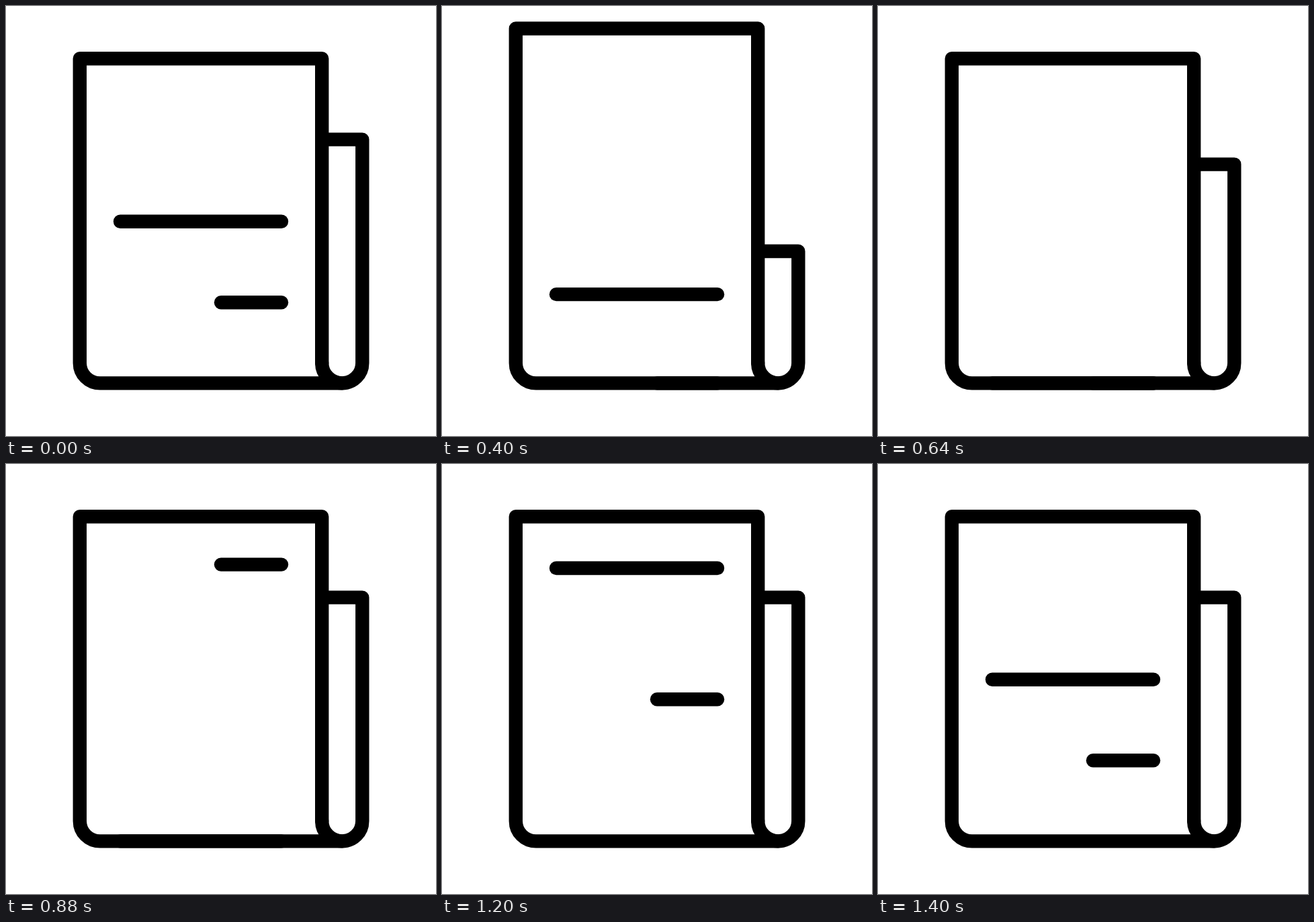
An HTML page for the animation above (2 s loop, 640 by 640 pixels).

```html
<!DOCTYPE html>
<html lang="en">
<head>
<meta charset="utf-8">
<title>Folded paper</title>
<style>
  html, body { margin: 0; width: 100%; height: 100%; overflow: hidden; background: #fff; }
  svg { display: block; width: 100vw; height: 100vh; }
  path { fill: none; stroke: #000; stroke-width: 20.4; stroke-linecap: round; stroke-linejoin: round; }
</style>
</head>
<body>
<svg viewBox="0 0 640 640">
  <path id="sheet"/>
  <path id="flap"/>
  <path id="long"/>
  <path id="short"/>
</svg>
<script>
  const LOOP = 2000, STEP = 40;
  const LEFT = 109.8, RIGHT = 470.2, EDGE = 530.3;
  const TOP = 78.3, BEND = 531.4, BASE = 561.4;
  const LONG_Y = 320.8, SHORT_Y = 441.2;

  const smooth = u => u * u * (3 - 2 * u);
  const settle = u => 1 - Math.pow(1 - u, 1.06);

  // Each move is [start ms, end ms, from, to, easing]; the latest one begun wins.
  const tracks = {
    top: [
      [120, 360, TOP, 28.3, smooth],
      [360, 560, 28.3, TOP, smooth]
    ],
    flap: [
      [120, 360, 198.6, 369.8, smooth],
      [360, 760, 369.8, 198.6, smooth]
    ],
    long: [
      [123, 873, LONG_Y, 672, smooth],
      [1080, 1400, TOP, LONG_Y, smooth]
    ],
    short: [
      [120, 287, SHORT_Y, BASE, smooth],
      [770, 1360, TOP, SHORT_Y, settle]
    ]
  };

  function valueAt(track, t) {
    let move = track[0];
    for (const next of track) if (t >= next[0]) move = next;
    const [start, end, from, to, ease] = move;
    const u = Math.min(1, Math.max(0, (t - start) / (end - start)));
    return from + (to - from) * ease(u);
  }

  const setPath = (id, d) => document.getElementById(id).setAttribute('d', d);

  function draw(t) {
    const top = valueAt(tracks.top, t);
    const flap = valueAt(tracks.flap, t);
    // Lines vanish into the bottom border.
    const longY = Math.min(BASE, valueAt(tracks.long, t));
    const shortY = valueAt(tracks.short, t);

    setPath('sheet', `M500.2 ${BASE}H139.8A30 30 0 0 1 ${LEFT} ${BEND}V${top}H${RIGHT}V${BEND}`);
    setPath('flap', `M${RIGHT} ${BEND}A30.05 30 0 0 0 ${EDGE} ${BEND}V${flap}H${RIGHT}`);
    setPath('long', `M170 ${longY}H410`);
    setPath('short', `M320 ${shortY}H410`);
  }

  const origin = performance.now();
  function tick() {
    const t = (performance.now() - origin) % LOOP;
    draw(Math.floor(t / STEP) * STEP);
    requestAnimationFrame(tick);
  }
  draw(0);
  requestAnimationFrame(tick);
</script>
</body>
</html>
```
